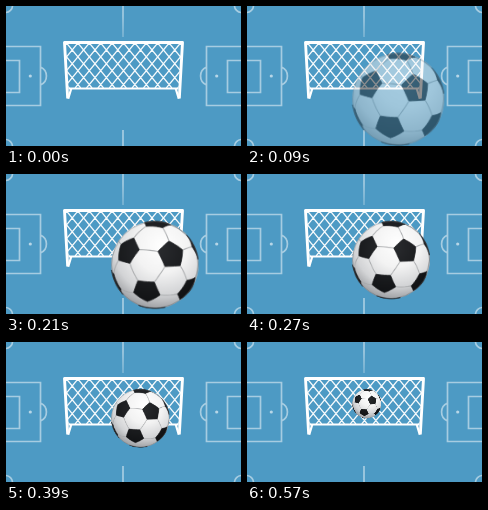
Animation of 235x140 px, one loop 1870 ms. Source, as an HTML page:

```html
<!DOCTYPE html>
<html lang="en">
<head>
<meta charset="utf-8">
<title>Football</title>
<style>
html, body { margin: 0; width: 100%; height: 100%; overflow: hidden; background: #4d9ac4; }
svg { display: block; width: 235px; height: 140px; }
.pitch { fill: none; stroke: #fff; stroke-opacity: .5; stroke-width: 1.7; }
.goal { fill: none; stroke: #fff; stroke-linejoin: round; }
#net { stroke-width: 1.25; stroke-opacity: .95; }
#ball { opacity: 0; transform-origin: 0 0; }
</style>
</head>
<body>
<svg viewBox="0 0 235 140">
  <defs>
    <linearGradient id="fadeTop" gradientUnits="userSpaceOnUse" x1="0" y1="0" x2="0" y2="32">
      <stop offset=".3" stop-color="#fff" stop-opacity=".5"/>
      <stop offset="1" stop-color="#fff" stop-opacity=".25"/>
    </linearGradient>
    <radialGradient id="leather" cx=".58" cy=".28" r=".78">
      <stop offset="0" stop-color="#fff"/>
      <stop offset=".4" stop-color="#f3f3f3"/>
      <stop offset=".72" stop-color="#d3d4d6"/>
      <stop offset="1" stop-color="#8e9094"/>
    </radialGradient>
    <radialGradient id="dark" gradientUnits="userSpaceOnUse" cx="50" cy="32" r="70">
      <stop offset="0" stop-color="#2b2d30"/>
      <stop offset="1" stop-color="#0e0f11"/>
    </radialGradient>
    <clipPath id="mouth"><path d="M59 37H176L172.5 82H62.5Z"/></clipPath>
    <g id="half">
      <path d="M-2 40.5H34.5V99.5H-2M-2 54.5H13.5V86.5H-2M34.5 61A9.8 9.8 0 0 1 34.5 79M-1 6.5A7 7 0 0 0 6.5 -1M-1 133.5A7 7 0 0 1 6.5 141"/>
      <circle cx="24.3" cy="70" r="1.6" fill="#fff" fill-opacity=".6" stroke="none"/>
    </g>
  </defs>
  <rect width="235" height="140" fill="#4d9ac4"/>
  <g class="pitch">
    <use href="#half"/>
    <use href="#half" transform="matrix(-1 0 0 1 235 0)"/>
    <path d="M117 124V141"/>
  </g>
  <rect x="116.2" y="0" width="1.6" height="31" fill="url(#fadeTop)"/>
  <g class="goal">
    <path id="net" clip-path="url(#mouth)"/>
    <path d="M62.5 82.5H172.5" stroke-width="2.2"/>
    <path d="M61.7 92.5L58.5 36.5H176.5L173.3 92.5" stroke-width="2.9"/>
    <path d="M62.2 92.6L65.3 82.5M172.8 92.6L169.7 82.5" stroke-width="2.2"/>
  </g>
  <g id="ball"></g>
</svg>
<script>
const $ = id => document.getElementById(id);

// Net: two mirrored families of slanted cords around the goal's centre
const cell = 11.4, lean = 37;
let cords = '';
for (let k = -9; k <= 9; k++) {
  const x = 117.5 + k * cell;
  cords += `M${x} 37l${lean} 45M${x} 37l${-lean} 45`;
}
$('net').setAttribute('d', cords);

// Ball: truncated icosahedron seen from the front, radius 50
const mix = (a, b, t) => a.map((v, i) => v + (b[i] - v) * t);
const dot = (a, b) => a.reduce((s, v, i) => s + v * b[i], 0);
const unit = v => v.map(c => c / Math.hypot(...v));
const cross = (a, b) => [
  a[1] * b[2] - a[2] * b[1],
  a[2] * b[0] - a[0] * b[2],
  a[0] * b[1] - a[1] * b[0]
];

const front = unit([.39, -.24, .89]);
const side = unit([front[2], 0, -front[0]]);
const down = cross(front, side);
const hubs = [front];
for (let k = 0; k < 5; k++) {
  const a = (51 + 72 * k) * Math.PI / 180;
  hubs.push(unit(front.map((v, i) => v / 2 + Math.cos(a) * side[i] + Math.sin(a) * down[i])));
}
hubs.push(...hubs.map(h => h.map(v => -v)));

// Points behind the horizon are pushed out to the rim
const project = p => {
  const [x, y, z] = unit(p);
  const r = z < 0 ? Math.hypot(x, y) : 1;
  return `${(50 + 50 * x / r).toFixed(2)} ${(50 + 50 * y / r).toFixed(2)}`;
};
const arc = (a, b) => [0, .2, .4, .6, .8, 1].map(t => project(mix(a, b, t))).join('L');
const near = h => hubs.filter(o => Math.abs(dot(h, o) - .447) < .05);

let seams = '', patches = '';
hubs.forEach((h, n) => {
  const ring = near(h);
  for (const o of ring) {
    const a = mix(h, o, .33), b = mix(h, o, .67);
    if (hubs.indexOf(o) > n && a[2] > 0 && b[2] > 0) seams += 'M' + arc(a, b);
  }
  if (h[2] < -.3) return;
  const w = unit(cross(h, ring[0])), u = cross(w, h);
  const angle = o => Math.atan2(dot(o, w), dot(o, u));
  const corners = ring.sort((a, b) => angle(a) - angle(b)).map(o => mix(h, o, .32));
  patches += 'M' + corners.map((c, i) => arc(c, corners[(i + 1) % 5])).join('L') + 'Z';
});

$('ball').innerHTML = `
  <circle cx="50" cy="50" r="50" fill="url(#leather)"/>
  <path d="${seams}" fill="none" stroke="#a9abad" stroke-width="1.1"/>
  <path d="${patches}" fill="url(#dark)" stroke="#232426" stroke-width=".8" stroke-linejoin="round"/>
  <circle cx="50" cy="50" r="49.5" fill="none" stroke="#55585c" stroke-opacity=".4" stroke-width="1"/>`;

// Fade in at full size, then shrink towards the net in 30 ms ticks
const loop = 1870, tick = 30, full = 6, last = 19;
const pose = i => {
  const size = 92 - 63 * Math.max(0, i - full) / (last - full);
  return {
    offset: i * tick / loop,
    opacity: Math.min(1, i / full),
    transform: `translate(105.3px, 47.2px) scale(${size / 100})`,
    easing: 'steps(1, end)'
  };
};
const frames = Array.from({ length: last + 1 }, (_, i) => pose(i));
frames.push({ ...pose(last), offset: 1 });
$('ball').animate(frames, { duration: loop, iterations: Infinity });
</script>
</body>
</html>
```
